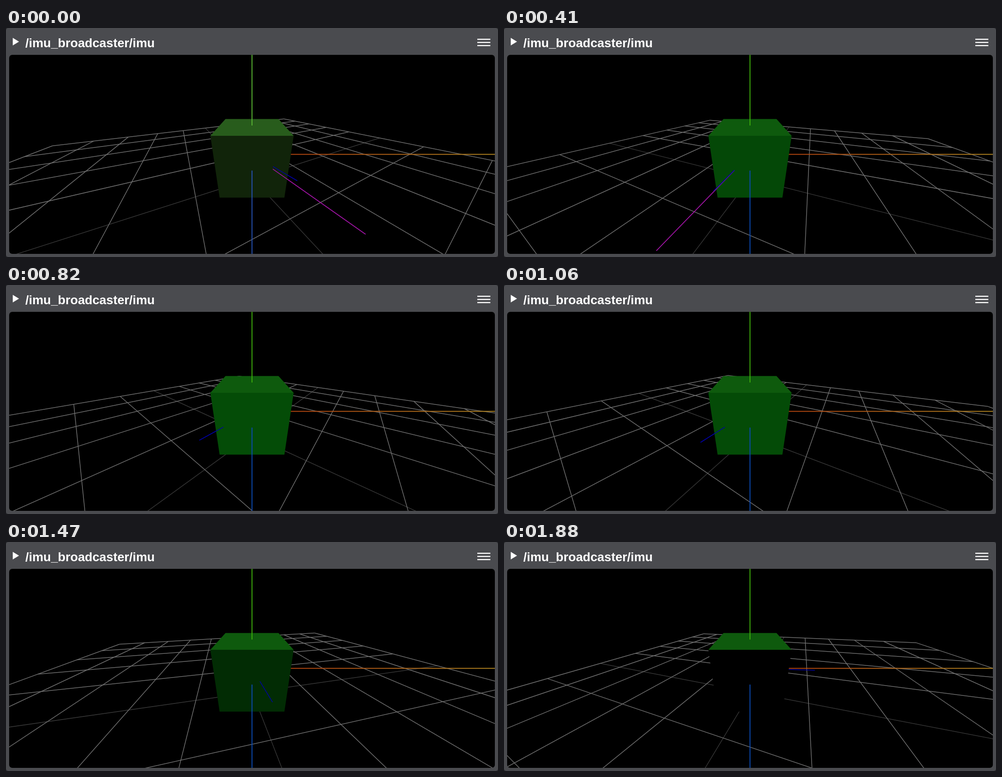
These frames come from a looping animation (1094x512 px, 2940 ms). An HTML page with a canvas:

```html
<!DOCTYPE html>
<html>
<head>
<meta charset="utf-8">
<style>
html, body { margin: 0; width: 100%; height: 100%; overflow: hidden; background: #26272a; }
canvas { display: block; }
</style>
</head>
<body>
<canvas id="view" width="1094" height="512"></canvas>
<script>
const ctx = document.getElementById('view').getContext('2d');
const LOOP = 2940;
// The display refreshes at these moments and holds in between.
const STEPS = [0, 60, 180, 290, 410, 530, 650, 710, 830, 940, 1060,
  1180, 1290, 1410, 1470, 1650, 1710, 1880];

// Sensor readings: time, yaw (deg), roll, pitch, then for the vectors:
// lead over the yaw (deg), rise, acceleration.
const KEYS = [
  [0, 27.8, .0185, .042, 1.8, .11, 1.64],
  [410, -23.5, -.0027, .045, .4, .015, 1.63],
  [650, -36.4, -.013, .047, .2, .013, 0],
  [1060, -33, -.002, .036, -1.5, .013, 0],
  [1290, -12.2, .005, .021, -.8, .084, 0],
  [1650, 40, .0165, .0255, -.7, .118, -2.65],
  [1880, 69.8, .031, .022, 0, .141, 0]
];
const RAD = Math.PI / 180;
const slope = i => (KEYS[i + 1][1] - KEYS[i][1]) / (KEYS[i + 1][0] - KEYS[i][0]);
const span = i => KEYS[i + 1][0] - KEYS[i][0];
function tangent(i) {
  if (i === 0) return slope(0);
  if (i === KEYS.length - 1) return slope(i - 1);
  return (slope(i - 1) * span(i) + slope(i) * span(i - 1)) / (span(i - 1) + span(i));
}

function pose(t) {
  let i = 0;
  while (i < KEYS.length - 2 && t >= KEYS[i + 1][0]) i++;
  const a = KEYS[i], b = KEYS[i + 1], h = span(i);
  const k = Math.min(1, (t - a[0]) / h), k2 = k * k, k3 = k2 * k;
  const [, , roll, pitch, lead, rise, accel] = a.map((v, n) => v + (b[n] - v) * k);
  const yaw = a[1] + (b[1] - a[1]) * (3 * k2 - 2 * k3)
    + h * (tangent(i) * (k3 - 2 * k2 + k) + tangent(i + 1) * (k3 - k2));
  return { yaw: yaw * RAD, heading: (yaw + lead) * RAD, roll, pitch, rise, accel };
}

// Camera at (0, 1, 2) looking at the origin, 75 degree field of view.
const DIST = Math.sqrt(5), SIN = 1 / DIST, COS = 2 / DIST;
const FOCAL = 222.5 / Math.tan(37.5 * RAD);
const NEAR = .1;
const depth = ([x, y, z]) => DIST - y * SIN - z * COS;
const mix = (p, q, k) => p.map((v, i) => v + (q[i] - v) * k);
function project(p) {
  const s = FOCAL / depth(p);
  return [547 + p[0] * s, 282.5 - (p[1] * COS - p[2] * SIN) * s];
}

function line(p, q, color, width = 1.5) {
  const dp = depth(p), dq = depth(q);
  if (dp < NEAR && dq < NEAR) return;
  const cut = (NEAR - dp) / (dq - dp);
  if (dp < NEAR) p = mix(p, q, cut);
  else if (dq < NEAR) q = mix(p, q, cut);
  ctx.strokeStyle = color;
  ctx.lineWidth = width;
  ctx.beginPath();
  ctx.moveTo(...project(p));
  ctx.lineTo(...project(q));
  ctx.stroke();
}

function face(points, color) {
  ctx.fillStyle = color;
  ctx.beginPath();
  points.forEach(p => ctx.lineTo(...project(p)));
  ctx.fill();
}

function drawGrid({ yaw, roll, pitch }) {
  const c = Math.cos(yaw), s = Math.sin(yaw), y = -.5;
  // Small-angle rotation about the origin.
  const at = (a, b) => {
    const x = a * c - b * s, z = -(a * s + b * c);
    return [x - roll * y, y + roll * x + pitch * z, z - pitch * y];
  };
  for (const center of [true, false]) {
    const color = center ? '#363636' : '#717171';
    for (let i = -5; i <= 5; i++) {
      if ((i === 0) !== center) continue;
      line(at(i, -5), at(i, 5), color);
      line(at(-5, i), at(5, i), color);
    }
  }
}

function drawScene(t) {
  const p = pose(t), warm = t < 60, origin = [0, 0, 0];
  drawGrid(p);

  const orange = ctx.createLinearGradient(633, 0, 1087, 0);
  orange.addColorStop(0, '#b4440f');
  orange.addColorStop(1, '#b08420');
  line(origin, [5, 0, 0], orange, 2);

  const ray = (len, rise) => {
    const flat = Math.sqrt(1 - rise * rise) * len;
    return [Math.sin(p.heading) * flat, rise * len, Math.cos(p.heading) * flat];
  };
  const rays = [
    [ray(p.accel, p.rise * .4), '#a414a8'],
    [ray(1, p.rise), '#0000a6']
  ];
  rays.forEach(([end, color]) => line(origin, end, color));

  const h = .5;
  const lit = Math.max(0, 76 * Math.cos(p.yaw + 41.5 * RAD));
  const front = warm ? '#11240a' : `rgb(${lit * .05},${lit},${lit * .09})`;
  face([[-h, h, h], [h, h, h], [h, -h, h], [-h, -h, h]], front);
  face([[-h, h, -h], [h, h, -h], [h, h, h], [-h, h, h]], warm ? '#285c1c' : '#0e5a0d');

  // Parts that stick out of the cube towards the camera.
  line([0, h, 0], [0, 5, 0], warm ? '#58b432' : '#3cac0c', 2);
  line([0, 0, h], [0, 0, 5], warm ? '#2450b0' : '#0a48ae', 2);
  rays.forEach(([end, color]) => {
    if (end[2] > h) line(mix(origin, end, h / end[2]), end, color);
  });
}

function box(x, y, w, h, r, color) {
  ctx.fillStyle = color;
  ctx.beginPath();
  ctx.roundRect(x, y, w, h, r);
  ctx.fill();
}

function drawPanel() {
  ctx.clearRect(0, 0, 1094, 512);
  box(0, 0, 1094, 512, 5, '#4a4b4f');
  ctx.fillStyle = '#fff';
  ctx.font = 'bold 27.7px "Liberation Sans", Arial, sans-serif';
  ctx.fillText('/imu_broadcaster/imu', 43, 43);
  ctx.beginPath();
  ctx.moveTo(15, 22);
  ctx.lineTo(29, 30.5);
  ctx.lineTo(15, 39);
  ctx.fill();
  for (const y of [24, 31, 38]) ctx.fillRect(1048, y, 29, 2.5);
  box(7, 60, 1080, 445, 7, '#000');
}

function frame() {
  const now = performance.now() % LOOP;
  const t = STEPS.filter(s => s <= now).pop();
  drawPanel();
  ctx.save();
  ctx.clip();
  drawScene(t);
  ctx.restore();
  requestAnimationFrame(frame);
}
frame();
</script>
</body>
</html>
```
